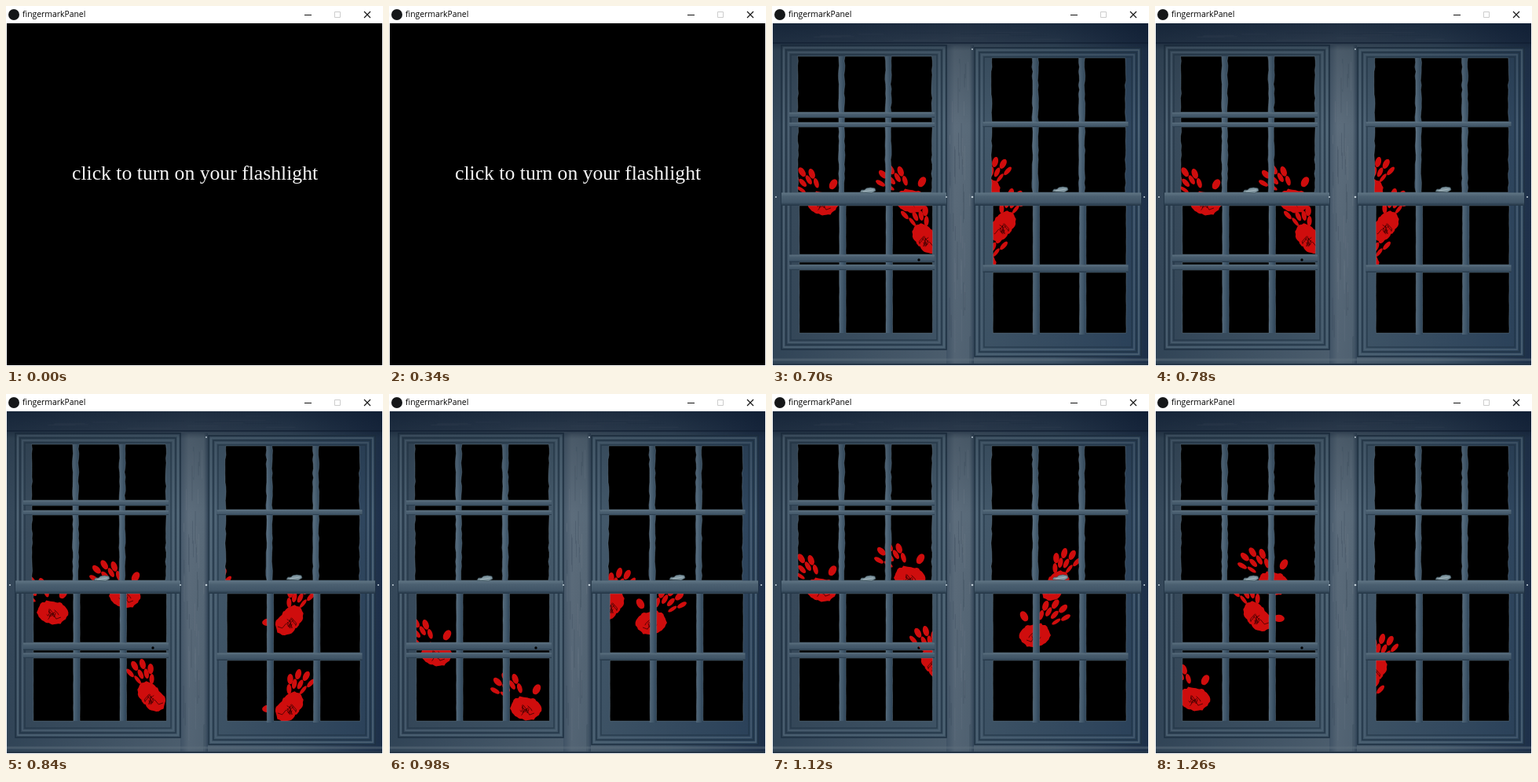
Recreate the animation shown at these times as an HTML page. Size 480x458 px, loop 1400 ms.

```html
<!DOCTYPE html>
<html lang="en">
<head>
<meta charset="utf-8">
<title>fingermarkPanel</title>
<style>
html, body { margin: 0; width: 100%; height: 100%; overflow: hidden; background: #fff; }
svg { display: block; width: 480px; height: 458px; }
.title { font: 10.4px "Open Sans", "Noto Sans", sans-serif; fill: #000; }
.prompt { font: 25.7px "Liberation Serif", "Noto Serif", serif; fill: #f4f4f4; }
.cover { animation: show40 1.4s step-end infinite; }
.scene { visibility: hidden; animation: show10 1.4s step-end infinite; }
@keyframes show40 { 0% { visibility: visible } 40%, 100% { visibility: hidden } }
@keyframes show10 { 0% { visibility: visible } 10%, 100% { visibility: hidden } }
</style>
</head>
<body>
<svg viewBox="0 0 480 458" xmlns="http://www.w3.org/2000/svg">
  <defs>
    <linearGradient id="wall">
      <stop offset="0" stop-color="#35485a"/>
      <stop offset=".5" stop-color="#566776"/>
      <stop offset=".75" stop-color="#44596c"/>
      <stop offset="1" stop-color="#1e304a"/>
    </linearGradient>
    <linearGradient id="sash" gradientUnits="userSpaceOnUse" x1="0" x2="480">
      <stop offset="0" stop-color="#37495a"/>
      <stop offset=".5" stop-color="#465b6c"/>
      <stop offset="1" stop-color="#2c435c"/>
    </linearGradient>
    <linearGradient id="post">
      <stop offset="0" stop-color="#46586a"/>
      <stop offset=".3" stop-color="#5d6d7c"/>
      <stop offset=".85" stop-color="#586978"/>
      <stop offset="1" stop-color="#36485b"/>
    </linearGradient>
    <linearGradient id="rail" x2="0" y2="1">
      <stop offset="0" stop-color="#647988"/>
      <stop offset=".3" stop-color="#4d6273"/>
      <stop offset=".75" stop-color="#43586a"/>
      <stop offset="1" stop-color="#233545"/>
    </linearGradient>
    <linearGradient id="bar">
      <stop offset="0" stop-color="#5a7082"/>
      <stop offset=".5" stop-color="#465d70"/>
      <stop offset="1" stop-color="#30465a"/>
    </linearGradient>
    <linearGradient id="shade" x2="0" y2="1">
      <stop offset="0" stop-color="#0c1a2e" stop-opacity=".75"/>
      <stop offset=".055" stop-color="#101d30" stop-opacity=".62"/>
      <stop offset=".08" stop-color="#14222f" stop-opacity=".25"/>
      <stop offset=".3" stop-color="#14222f" stop-opacity="0"/>
      <stop offset="1" stop-color="#142a40" stop-opacity=".14"/>
    </linearGradient>
    <g id="spread" fill="#cf0d0d"></g>
    <g id="slant" fill="#cf0d0d"></g>
    <mask id="cut" maskUnits="userSpaceOnUse" x="0" y="0" width="480" height="458">
      <path d="M0 0H480V458H0Z" fill="#fff"/>
      <path id="holes"/>
      <circle cx="187" cy="323" r="1.7"/>
    </mask>
    <clipPath id="view"><path d="M1 22H479V457H1Z"/></clipPath>
  </defs>

  <path d="M0 0H480V458H0Z" fill="#fff"/>
  <g clip-path="url(#view)">
    <path d="M1 22H479V457H1Z"/>
    <g id="scenes"></g>
    <g mask="url(#cut)">
      <path d="M1 22H479V457H1Z" fill="url(#wall)"/>
      <path d="M222 50H257V457H222Z" fill="url(#post)"/>
      <g id="frames"></g>
      <g id="grain" fill="none" stroke-width=".8"></g>
      <path d="M1 450H479" stroke="#6a7a86" stroke-width="3" opacity=".5"/>
      <path d="M1 456H479" stroke="#2a3a4a" stroke-width="2.5"/>
      <path d="M1 22H479V457H1Z" fill="url(#shade)"/>
      <path d="M1 47H479" stroke="#101d30" stroke-width="2" opacity=".6"/>
    </g>
    <path id="rims" fill="none" stroke="#7b919e" stroke-width=".7" opacity=".5"/>
    <g id="latch" fill="#7f959f" stroke="#3c4f5a" stroke-width=".7">
      <path d="M112 237L114 234Q118 235 120 232Q125 230 131 232L132 235L127 238Z"/>
      <path d="M116 236L129 234" stroke="#b5c5cb"/>
    </g>
    <use href="#latch" x="245" y="-1"/>
    <g fill="#c3d0d8">
      <circle cx="5" cy="243" r="1"/><circle cx="222" cy="243" r="1"/>
      <circle cx="255" cy="243" r="1.3"/><circle cx="474" cy="243" r="1"/>
      <circle cx="255" cy="55" r=".9"/>
    </g>
    <g class="cover">
      <path d="M1 22H479V457H1Z"/>
      <text class="prompt" x="84" y="221">click to turn on your flashlight</text>
    </g>
  </g>

  <circle cx="10" cy="11" r="7" fill="#151719"/>
  <text class="title" x="21" y="14.3">fingermarkPanel</text>
  <g fill="none" stroke="#111">
    <path d="M380 11.5H389"/>
    <path d="M418.5 7.5H425.5V14.5H418.5Z" stroke="#ccc"/>
    <path d="M456 7L464 15M464 7L456 15" stroke-width="1.1"/>
  </g>
</svg>
<script>
const el = id => document.getElementById(id);
const range = (n, f) => Array.from({ length: n }, (_, i) => f(i));
let seed = 11;
const rnd = () => (seed = seed * 16807 % 2147483647) / 2147483647;
const jitter = size => (rnd() - .5) * size;
const rect = (x, y, w, h, fill) => `<rect x="${x}" y="${y}" width="${w}" height="${h}" fill="${fill}"/>`;

// Each window: outer edges, first pane, and top and bottom of every pane row.
const windows = [
  { x: 12, y: 50, r: 222, b: 437, pane: 33,
    rows: [[64, 135], [142, 148], [154, 237], [254, 316], [326, 329], [336, 416]] },
  { x: 258, y: 53, r: 470, b: 446, pane: 279.5,
    rows: [[66, 147], [154, 237], [254, 329], [339, 416]] }
];
const pitch = 59.3, paneW = 52;

// Pane outline, rough only where the glass is tall and in the upper sash.
function pane(x, top, bottom) {
  const low = top > 250, rough = low || bottom - top < 10 ? .3 : 1.4;
  const l = x + (low ? 1.8 : 0), r = l + paneW - (low ? 1 : 0);
  const n = Math.ceil((bottom - top) / 6);
  const edge = (ex, from, to) => range(n + 1, i =>
    `${(ex + jitter(rough)).toFixed(1)} ${(from + (to - from) * i / n).toFixed(1)}`).join('L');
  return `M${edge(l, bottom, top)}L${edge(r, top, bottom)}Z`;
}

// Nested mouldings, then upright bars, then a rail in every gap between rows.
function frame({ x, y, r, b, pane, rows }) {
  const moulding = range(5, i => {
    const d = i * 3;
    return `<rect x="${x + d}" y="${y + d}" width="${r - x - 2 * d}" height="${b - y - 2 * d}"
      fill="${i ? 'none' : 'url(#sash)'}" stroke="${i % 2 ? '#5a6f80' : '#213344'}" stroke-width="1.6" opacity="${1 - i * .1}"/>`;
  }).join('');
  const uprights = [1, 2].map(i => rect(pane + i * pitch - 7, rows[0][0], 9, 352, 'url(#bar)')).join('');
  const rails = rows.slice(1).map(([top], i) => {
    const end = rows[i][1], gap = top - end, main = gap > 14;
    const left = main ? x : pane - 11, right = main ? r : pane + 174;
    return rect(left, end + .5, right - left, gap - .5, 'url(#rail)');
  }).join('');
  return moulding + uprights + rails;
}
el('frames').innerHTML = windows.map(frame).join('');
const glass = windows.map(w => w.rows.map(([t, b]) =>
  range(3, i => pane(w.pane + i * pitch, t, b)).join('')).join('')).join('');
el('holes').setAttribute('d', glass);
el('rims').setAttribute('d', glass);

// Wood grain: upright on the post, level along the top.
const grain = (x, y, line) =>
  `<path d="M${x.toFixed(1)} ${y.toFixed(1)}${line}" stroke="${rnd() < .5 ? '#75838f' : '#3a4a58'}" opacity=".4"/>`;
el('grain').innerHTML =
  range(45, () => grain(225 + rnd() * 28, 55 + rnd() * 370, `v${(10 + rnd() * 40).toFixed(1)}`)).join('') +
  range(16, () => grain(rnd() * 420, 26 + rnd() * 18, `h${(25 + rnd() * 60).toFixed(1)}`)).join('');

// A print: four fanned fingers in two marks each, a thumb and a cracked, uneven palm.
function hand({ x, y, tilt, thumb, palmDir, palmLong }) {
  const mark = (deg, dist, long, wide) =>
    `<ellipse cx="${dist}" rx="${long}" ry="${wide}" transform="rotate(${deg})"/>`;
  const fingers = range(4, i => {
    const deg = 210 + tilt + 13.5 * i, reach = 45 + 7 * i - 2.9 * i * i - tilt / 4;
    const wide = i ? 3.8 : 2.9;
    return mark(deg, reach, 6.7, wide) + mark(deg + 3, reach - 13, 6.5, wide * .8);
  }).join('');
  const palm = range(40, i => {
    const a = i * Math.PI / 20;
    const d = 17 + palmLong * Math.cos(2 * (a - palmDir * Math.PI / 180)) + jitter(2.2);
    return `${(d * Math.cos(a)).toFixed(1)} ${(d * Math.sin(a)).toFixed(1)}`;
  }).join('L');
  const cracks = range(9, i =>
    `M${jitter(10).toFixed(1)} ${jitter(10).toFixed(1)}l${jitter(14).toFixed(1)} ${(3 + rnd() * 4).toFixed(1)} ${jitter(12).toFixed(1)} ${jitter(8).toFixed(1)}`).join('');
  return `<g transform="translate(${x} ${y})">${fingers}${mark(thumb, 28, 7, 4.6)}<path d="M${palm}Z"/>` +
    `<path d="${cracks}" fill="none" stroke="#3a0000" stroke-width=".8"/></g>`;
}
el('spread').innerHTML = hand({ x: 44, y: 46, tilt: 0, thumb: -60, palmDir: 10, palmLong: 2.5 });
el('slant').innerHTML = hand({ x: 33, y: 46, tilt: 18, thumb: 5, palmDir: 50, palmLong: 4 });

// Corner of every print: a is spread, s is slanted, capitals are mirrored.
const scenes = [
  's163,241 s158,302 S251,187',
  'a20,205 a133,202 s163,250 S241,194 S261,234 S236,289',
  'a15,232 a107,211 s152,339 S223,221 S329,242 S329,352',
  'a16,285 a130,354 S250,223 A313,245',
  'a19,203 a131,188 s174,297 S329,198 A314,261',
  'a106,195 s97,237 a6,342 S246,307 S228,360'
];
function print(code) {
  const kind = code[0], [x, y] = code.slice(1).split(',').map(Number);
  const id = kind.toLowerCase() === 'a' ? 'spread' : 'slant';
  const place = kind < 'a' ? `translate(${x + 65} ${y}) scale(-1 1)` : `translate(${x} ${y})`;
  return `<use href="#${id}" transform="${place}"/>`;
}
el('scenes').innerHTML = scenes.map((s, i) =>
  `<g class="scene" style="animation-delay:${560 + i * 140 - 1400}ms">${s.split(' ').map(print).join('')}</g>`).join('');
</script>
</body>
</html>
```
